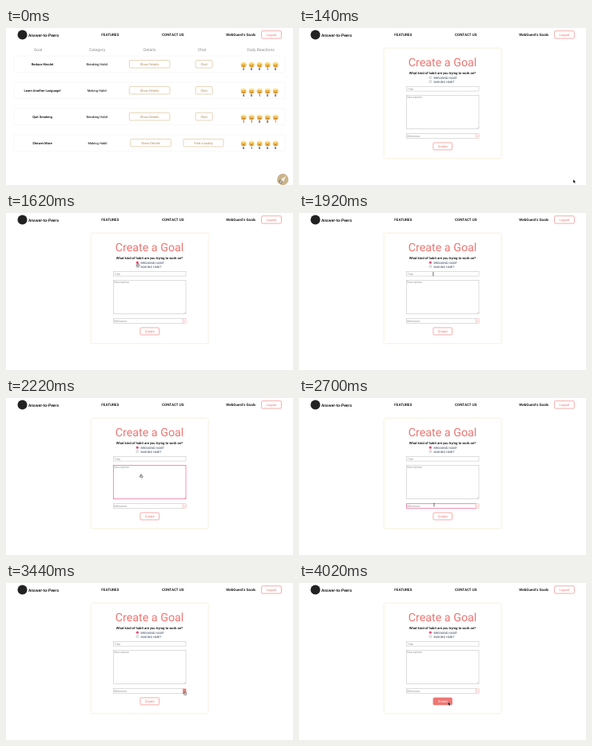
Animation of 359x197 px, one loop 4320 ms. Source, as an HTML page:

```html
<!DOCTYPE html>
<html lang="en">
<head>
<meta charset="utf-8">
<title>Create a Goal</title>
<style>
html, body { margin: 0; height: 100%; overflow: hidden; background: #fff; }
svg { display: block; width: 100%; height: 100%; font: 4.1px Roboto, sans-serif; text-rendering: geometricPrecision; }
.nav { font-size: 4.6px; font-weight: 500; }
.mid { text-anchor: middle; }
.head { font-size: 5px; fill: #8d8d8d; }
.bold { font-weight: 500; }
.tan { fill: #b48a52; }
.row { fill: #fff; stroke: #f1f1f1; stroke-width: .6; }
.tanBox { fill: #fff; stroke: #d6b98c; stroke-width: .6; }
.red { fill: #ee7672; }
.redBox { fill: #fff; stroke: #ee7672; stroke-width: .6; }
.field { fill: #fff; stroke: #bcbcbc; stroke-width: .5; }
.focus { stroke: #ee5f92; stroke-width: .7; }
.hint { font-size: 3.7px; fill: #959595; }
.label { font-size: 3.75px; fill: #34455f; }
.radio { fill: #fff; stroke: #777; stroke-width: .4; }
.picked { stroke: #ea5580; fill: #ea4a76; }
.hover { fill: #ee7672; }
.hover + text { fill: #fff; }
#card { fill: #fff; filter: drop-shadow(0 0 1.3px #f0dcb2); }
#plus { stroke: #ef9c98; stroke-width: .5; }
</style>
</head>
<body>
<svg viewBox="0 0 359 197">
  <defs>
    <linearGradient id="skin" x2="0" y2="1"><stop offset=".1" stop-color="#ffe9a6"/><stop offset=".5" stop-color="#fbc94f"/><stop offset="1" stop-color="#e69a2e"/></linearGradient>
    <g id="face">
      <circle r="3.5" fill="url(#skin)"/>
      <path d="M-1.4 -.9v.8M1.4 -.9v.8M-1.4 1.4Q0 2.2 1.4 1.4" fill="none" stroke="#80501c" stroke-width=".6"/>
    </g>
  </defs>

  <circle cx="20.5" cy="8.5" r="6" fill="#222"/>
  <text x="28" y="10.8" class="bold" font-size="5.1">Answer-to-Peers</text>
  <g class="nav">
    <text x="119.3" y="10.2">FEATURES</text>
    <text x="195" y="10.2">CONTACT US</text>
    <text x="275.3" y="10.2">WebGuest's Goals</text>
  </g>
  <rect class="redBox" x="319.6" y="3.7" width="24.8" height="9.4" rx="1.5"/>
  <text class="red mid" x="332" y="9.9">Logout</text>

  <g id="list"></g>

  <g id="form">
    <rect id="card" x="106.8" y="25.8" width="145.9" height="137.4" rx="1"/>
    <text class="red mid" x="179.5" y="48.2" font-size="14.3">Create a Goal</text>
    <text class="bold mid" x="179.5" y="57.6" font-size="4.2">What kind of habit are you trying to work on?</text>
    <circle id="breaking" class="radio" cx="164.3" cy="62.2" r="1.4"/>
    <circle class="radio" cx="164.3" cy="67.2" r="1.4"/>
    <text class="label" x="168.6" y="63.5">BREAKING HABIT</text>
    <text class="label" x="168.6" y="68.5">MAKING HABIT</text>

    <rect id="title" class="field" x="134.3" y="73.5" width="90.7" height="5.6"/>
    <text class="hint" x="135.7" y="77.6">Title</text>
    <rect id="about" class="field" x="134.3" y="84.6" width="90.7" height="42.1"/>
    <text class="hint" x="135.2" y="88.4">Description</text>
    <path d="M222.6 126l1.8-1.8M223.7 126l.7-.7" stroke="#888" stroke-width=".3"/>
    <rect id="step" class="field" x="134.3" y="132.7" width="87" height="5.6"/>
    <text class="hint" x="135.2" y="136.8">Milestone</text>
    <rect id="plus" class="redBox" x="221.3" y="132.7" width="3.9" height="5.6" rx=".4"/>
    <text class="red mid" x="223.3" y="136.7" font-size="3.4">+</text>

    <rect id="create" class="redBox" x="167.9" y="143.9" width="23.7" height="9" rx="1.5"/>
    <text class="red mid" x="179.6" y="149.9">Create</text>
  </g>

  <g id="pointer">
    <path id="arrow" d="M0 0v4.4l1.1-.9.7 1.5.8-.4-.7-1.4h1.4z" fill="#000" stroke="#fff" stroke-width=".3"/>
    <path id="hand" d="M-.4 .3q.5-.7 1 0v1.3l1.3.4q.7.2.5 1l-.5 1.4h-2.2l-1.4-1.6q-.1-.7.6-.5l.7.4z" fill="#ddd" stroke="#333" stroke-width=".5"/>
    <path id="beam" d="M-.8 -2.1q.8 0 .8.5v3.2q0 .5-.8.5M.8 -2.1q-.8 0-.8.5v3.2q0 .5.8.5" fill="none" stroke="#333" stroke-width=".4"/>
  </g>
</svg>
<script>
const LOOP = 4320;
const $ = id => document.getElementById(id);
const text = (x, y, cls, s) => `<text x="${x}" y="${y}" class="mid ${cls}">${s}</text>`;
const button = (x, y, w, s) =>
  `<rect class="tanBox" x="${x - w / 2}" y="${y - 4.8}" width="${w}" height="9.5" rx="1.5"/>` + text(x, y + 1.4, 'tan', s);

const heads = [['Goal', 40], ['Category', 114], ['Details', 179.6], ['Chat', 245.2], ['Daily Reactions', 318.7]];
const goals = [
  ['Reduce Kinolet', 'Breaking', '20010'],
  ['Learn Another Language!', 'Making', '40100'],
  ['Quit Smoking', 'Breaking', '11001'],
  ['Shower More', 'Making', '01000']
];

function row([name, habit, counts], i) {
  const y = 45.3 + i * 32.95, last = i === 3;
  const faces = [...counts].map((n, k) => {
    const x = 297.2 + k * 10;
    return `<use href="#face" x="${x}" y="${y + .7}"/>` +
      `<text x="${x}" y="${y + 7.7}" class="mid bold" fill="${i === 2 && k === 4 ? '#e33' : '#222'}">${n}</text>`;
  }).join('');
  return `<rect class="row" x="10" y="${y - 10.2}" width="339" height="20.6" rx="1"/>` +
    text(45.5, y + 1.4, 'bold', name) + text(last ? 114.6 : 113.8, y + 1.4, '', habit + ' Habit') +
    button(last ? 181 : 179.6, y, 50.6, 'Show Details') +
    (last ? button(247, y, 50, 'Find a buddy') : button(247.7, y, 21, 'Chat')) + faces;
}

$('list').innerHTML = heads.map(([s, x]) => text(x, 28.7, 'head', s)).join('') + goals.map(row).join('') +
  '<circle cx="346.2" cy="190" r="7.2" fill="#cbb48c"/>' +
  '<path d="M342.5 191l7-4.5-2.5 6-2-1.5z" fill="#f3ead8" stroke="#f3ead8" stroke-width=".7"/>';

const smooth = p => p * p * (3 - 2 * p);
const out = n => p => 1 - (1 - p) ** n;
// start, end, target x, target y, easing for x and y
const moves = [
  [600, 1120, 166, 60.2, out(2.5), out(4)],
  [1140, 1420, 164.6, 62.8],
  [1620, 1960, 168, 77],
  [2100, 2220, 168.8, 95.6],
  [2380, 2700, 169, 134],
  [2860, 3180, 221, 140.6],
  [3180, 3340, 223.6, 136],
  [3600, 4020, 186.6, 149.3]
];

function position(t) {
  let x = 343, y = 190;
  for (const [a, b, tx, ty, ex = smooth, ey = ex] of moves) {
    if (t < a) break;
    const p = Math.min(1, (t - a) / (b - a));
    x += (tx - x) * ex(p);
    y += (ty - y) * ey(p);
  }
  return [x, y];
}

const show = (id, on) => $(id).style.display = on ? '' : 'none';
const mark = (id, cls, on) => $(id).classList.toggle(cls, on);

function draw(t) {
  const [x, y] = position(t);
  const over = (l, top, r, b) => x >= l && x <= r && y >= top && y <= b;
  const onPlus = over(221.3, 132.7, 225.2, 138.3);
  const onText = over(134, 73.5, 225, 79.1) || over(134, 132.7, 221.3, 138.3);
  const onHand = t < 140 || onPlus || over(162, 59.5, 198, 69) || over(134, 84.6, 225, 126.7);

  show('list', t < 20);
  show('form', t >= 20);
  mark('breaking', 'picked', t >= 1400);
  mark('title', 'focus', t >= 1960 && t < 2220);
  mark('about', 'focus', t >= 2220 && t < 2700);
  mark('step', 'focus', t >= 2700 && t < 3440);
  mark('plus', 'hover', onPlus);
  mark('create', 'hover', over(168, 144, 191.6, 153));

  show('hand', onHand);
  show('beam', onText);
  show('arrow', !onHand && !onText);
  $('pointer').setAttribute('transform', `translate(${x} ${y})`);
}

const begin = performance.now();
function frame() {
  draw((performance.now() - begin) % LOOP);
  requestAnimationFrame(frame);
}
frame();
</script>
</body>
</html>
```
